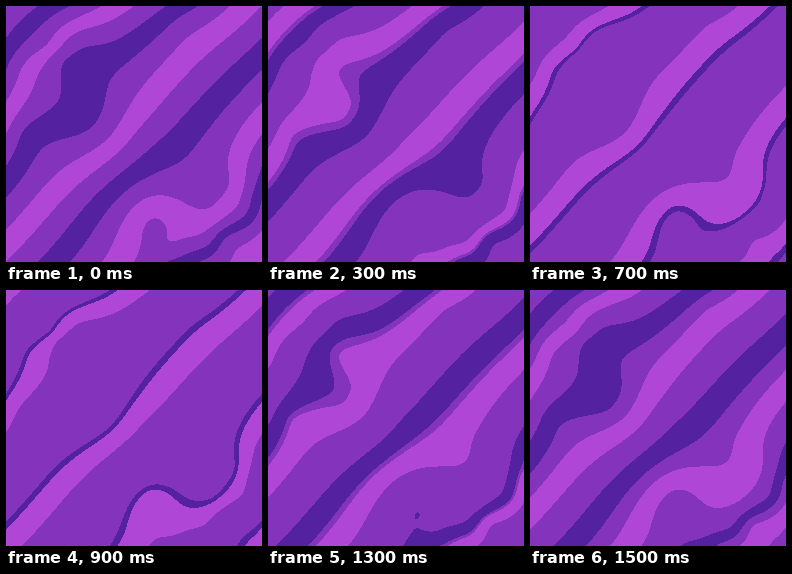
Animation of 256x256 px, one loop 1600 ms. Source, as an HTML page with a canvas:

```html
<!DOCTYPE html>
<html lang="en">
<head>
<meta charset="utf-8">
<title>Flowing bands</title>
<style>
html, body { margin: 0; width: 100%; height: 100%; overflow: hidden; background: #8434bc; }
canvas { display: block; width: 100vw; height: 100vh; image-rendering: pixelated; }
</style>
</head>
<body>
<canvas id="stage" width="256" height="256"></canvas>
<script>
const SIZE = 256, STEP = 100, STEPS = 16, PERIOD = SIZE / 2;
const BRIGHT = [176, 70, 214], MID = [132, 52, 188], DARK = [84, 34, 160];

// Key points that bend the straight bands: x, y, shift in percent of a period
const UPPER_FOLD = [
  [48, 18, 11], [46, 44, 18], [20, 62, 18], [72, 33, 30], [51, 51, 33], [44, 80, 18],
  [108, 38, 14], [71, 64, 32], [84, 99, -5], [75, 116, -10], [22, 128, 17]
];
const MIDDLE = [
  [175, 20, 9], [98, 129, -10], [135, 130, 1], [190, 118, -2], [203, 148, -13], [175, 176, -12]
];
const LOWER_FOLD = [
  [135, 184, 12], [228, 178, -37], [208, 210, -42], [167, 207, -5], [145, 202, 19],
  [128, 215, 19], [151, 223, 15], [164, 236, -13], [200, 236, -25], [237, 205, -31], [222, 235, 4]
];

const SOFT = 64, SMOOTH = 0.8;
const kernel = (dx, dy) => Math.sqrt(dx * dx + dy * dy + SOFT);
const fract = v => v - Math.floor(v);

function anchors() {
  const list = [...UPPER_FOLD, ...MIDDLE, ...LOWER_FOLD];
  // The bands stay straight along the border
  for (let p = 0; p < SIZE; p += 32)
    list.push([p, 0, 0], [SIZE, p, 0], [SIZE - p, SIZE, 0], [0, SIZE - p, 0]);
  return list.map(([x, y, percent]) => ({ x, y, shift: percent / 100 }));
}

// Gaussian elimination with pivoting
function solve(rows) {
  const n = rows.length;
  for (let c = 0; c < n; c++) {
    let best = c;
    for (let r = c + 1; r < n; r++)
      if (Math.abs(rows[r][c]) > Math.abs(rows[best][c])) best = r;
    [rows[c], rows[best]] = [rows[best], rows[c]];
    for (let r = c + 1; r < n; r++) {
      const f = rows[r][c] / rows[c][c];
      for (let k = c; k <= n; k++) rows[r][k] -= f * rows[c][k];
    }
  }
  const out = new Float64Array(n);
  for (let r = n - 1; r >= 0; r--) {
    let sum = rows[r][n];
    for (let k = r + 1; k < n; k++) sum -= rows[r][k] * out[k];
    out[r] = sum / rows[r][r];
  }
  return out;
}

// Phase of every pixel: a diagonal ramp plus the smoothly blended shifts
function buildField() {
  const pts = anchors();
  const weights = solve(pts.map((a, i) => [
    ...pts.map((b, j) => kernel(a.x - b.x, a.y - b.y) - (i === j ? SMOOTH : 0)),
    a.shift
  ]));
  const phases = new Float32Array(SIZE * SIZE);
  for (let y = 0, i = 0; y < SIZE; y++)
    for (let x = 0; x < SIZE; x++, i++) {
      let phase = (x + y + 1) / PERIOD;
      for (let k = 0; k < pts.length; k++)
        phase += weights[k] * kernel(x + 0.5 - pts[k].x, y + 0.5 - pts[k].y);
      phases[i] = phase;
    }
  return phases;
}

const ctx = document.getElementById("stage").getContext("2d");
const image = ctx.createImageData(SIZE, SIZE);
const field = buildField();

// Bright bands run twice as fast as the dark ones and cover them
function colorAt(phase, turn) {
  if (fract(phase - 2 * turn) >= 0.75) return BRIGHT;
  const dark = fract(phase - turn);
  return dark >= 0.25 && dark < 0.5 ? DARK : MID;
}

function draw(step) {
  const turn = step / STEPS;
  field.forEach((phase, i) => {
    image.data.set(colorAt(phase, turn), i * 4);
    image.data[i * 4 + 3] = 255;
  });
  ctx.putImageData(image, 0, 0);
}

const start = performance.now();
let shown = -1;
function tick() {
  const step = Math.floor((performance.now() - start) / STEP) % STEPS;
  if (step !== shown) draw(shown = step);
  requestAnimationFrame(tick);
}
tick();
</script>
</body>
</html>
```
